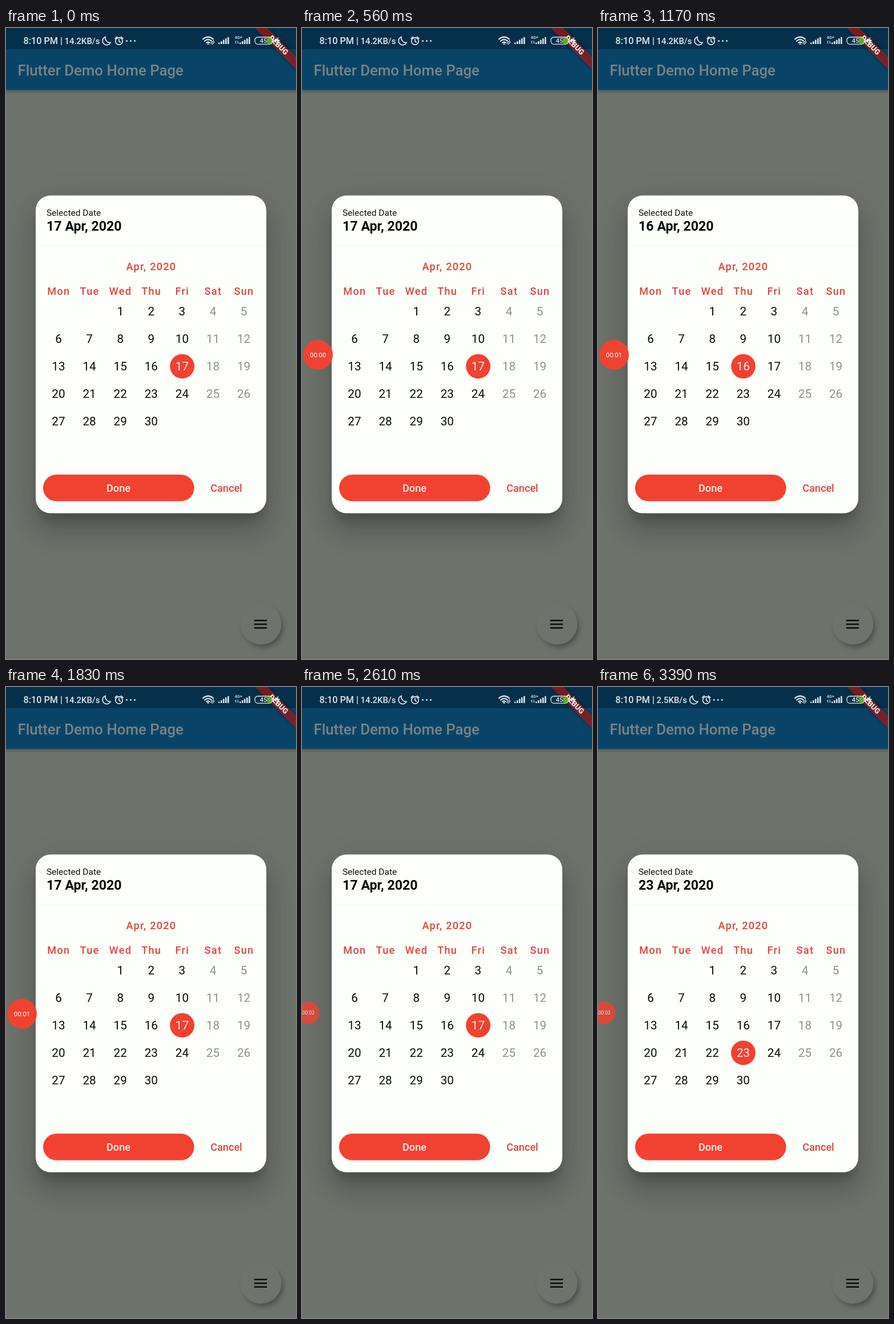
Animation of 508 by 1102 pixels, one loop 3.45 s. Source, as an HTML page:

```html
<!DOCTYPE html>
<html lang="en">
<head>
<meta charset="utf-8">
<title>Date picker</title>
<style>
  html, body { margin: 0; width: 100%; height: 100%; overflow: hidden; background: #6d726b; }
  svg { display: block; width: 100%; height: 100%; font-family: Roboto, sans-serif; }
  .mid { text-anchor: middle; }
  .medium { font-weight: 500; }
  .label { font-size: 18.1px; font-weight: 500; fill: #e0443b; }
  .spaced { letter-spacing: 1.29px; }
  .day { font-size: 20.7px; text-anchor: middle; }
  .line { fill: none; stroke: #dfe6e9; stroke-width: 1.7; stroke-linecap: round; }
</style>
</head>
<body>
<svg viewBox="0 0 508 1102" preserveAspectRatio="none">
  <defs>
    <linearGradient id="barShade" x1="0" y1="0" x2="0" y2="1">
      <stop offset="0" stop-color="#000" stop-opacity=".2"/>
      <stop offset="1" stop-color="#000" stop-opacity="0"/>
    </linearGradient>
  </defs>

  <!-- page behind the dialog -->
  <rect width="508" height="1102" fill="#6d726b"/>
  <rect y="108" width="508" height="7" fill="url(#barShade)"/>
  <rect width="508" height="108.3" fill="#094468"/>
  <rect width="508" height="37" fill="#05304b"/>
  <text class="medium" x="20.5" y="83" font-size="25.8" fill="#7c8283">Flutter Demo Home Page</text>

  <g>
    <circle cx="450.5" cy="1047" r="34.5" fill="#000" opacity=".32" style="filter:blur(5px)"/>
    <circle cx="446.5" cy="1041" r="36" fill="#6e736c"/>
    <path d="M434.7 1034.7h22.4M434.7 1041.2h22.4M434.7 1047.7h22.4" stroke="#0a0b0a" stroke-width="2.5"/>
  </g>

  <path d="M436 0H458L508 50V72Z" fill="#000" opacity=".4" style="filter:blur(3px)"/>
  <path d="M436 0H458L508 50V72Z" fill="#b71c1c" opacity=".627"/>
  <text class="mid" transform="translate(477.7 29.7) rotate(45)" y="4.7" font-size="13" font-weight="900" fill="#f0eaea">DEBUG</text>

  <!-- status bar -->
  <g fill="#dfe6e9">
    <text class="medium" x="30.5" y="28" font-size="16.2">8:10 PM</text>
    <rect x="96.3" y="16" width="1.4" height="14"/>
    <text class="medium" id="speed" x="102.5" y="28" font-size="14.9"></text>
    <g id="notices">
      <path class="line" d="M174 15.5A7.3 7.3 0 1 0 183 25.5A8.4 8.4 0 0 1 174 15.5Z"/>
      <circle class="line" cx="198" cy="23" r="6.2"/>
      <path class="line" d="M198 19.5V23.5L200.5 25M191 18.5L194.5 15.5M205 18.5L201.5 15.5"/>
      <circle cx="211.5" cy="22.5" r="1.5"/>
      <circle cx="218.5" cy="22.5" r="1.5"/>
      <circle cx="225.5" cy="22.5" r="1.5"/>
    </g>
    <path class="line" style="stroke-width:2.2" d="M345 19.5Q354 12 363 19.5M348 22.8Q354 17.5 360 22.8M351 25.6Q354 23 357 25.6"/>
    <circle cx="354" cy="27.5" r="1.5"/>
    <path class="line" style="stroke-width:1.2" d="M359 27L364 22M361 28.5L365 24.5"/>
    <g id="signal"></g>
    <text class="medium" x="400.5" y="19" font-size="7.4">4G+</text>
    <path class="line" style="stroke-width:1" d="M402.5 27V22.5L401.3 24M406 22.5V27L407.2 25.5"/>
    <rect x="457" y="17" width="9" height="10.5" rx="3" fill="#58b11f"/>
    <rect class="line" x="436" y="16" width="30.5" height="12.3" rx="5" style="stroke-width:1.3"/>
    <rect x="467.5" y="20" width="1.6" height="4.5"/>
    <text class="mid medium" x="451" y="26.2" font-size="11">45</text>
    <path d="M477.5 15L471 23.3H475L473 29.5L480.5 20.8H476.4Z"/>
  </g>

  <!-- dialog -->
  <g id="shadows"></g>
  <rect x="52" y="292.5" width="404" height="555" rx="26" fill="#fcfffa"/>
  <path d="M52 380H456" stroke="#f5f8f2"/>
  <text x="70.9" y="328" font-size="15.5" fill="#111">Selected Date</text>
  <text id="heading" x="71" y="354" font-size="23.2" font-weight="700" fill="#080808"></text>
  <text class="label spaced mid" x="254.5" y="423">Apr, 2020</text>
  <g id="weekdays"></g>
  <circle id="mark" r="21.4" fill="#f14231"/>
  <g id="days"></g>
  <rect x="65" y="780" width="264.6" height="46.5" rx="23.2" fill="#f14231"/>
  <text class="mid medium" x="197" y="809.6" font-size="18.1" fill="#fdeee9">Done</text>
  <text class="label mid" x="386" y="809.6">Cancel</text>

  <!-- recording bubble -->
  <g id="bubble">
    <circle r="26" fill="#f14231"/>
    <text id="clock" class="mid" y="4" font-size="11.5" fill="#fff"></text>
  </g>
</svg>

<script>
const LOOP = 3450;
const $ = id => document.getElementById(id);

function add(parent, tag, attrs, text = '') {
  const el = document.createElementNS('http://www.w3.org/2000/svg', tag);
  for (const k in attrs) el.setAttribute(k, attrs[k]);
  el.textContent = text;
  return $(parent).appendChild(el);
}

const colX = c => 92 + 54.1 * c;
const rowY = r => 495 + 48 * r;
const cell = day => {
  const i = day + 1; // the month starts on a Wednesday
  return { col: i % 7, row: Math.floor(i / 7) };
};

['Mon', 'Tue', 'Wed', 'Thu', 'Fri', 'Sat', 'Sun'].forEach((name, c) =>
  add('weekdays', 'text', { class: 'label spaced mid', x: colX(c) + 0.4, y: 466 }, name));

const days = [];
for (let d = 1; d <= 30; d++) {
  const { col, row } = cell(d);
  days[d] = add('days', 'text', { class: 'day', x: colX(col), y: rowY(row) + 7.3 }, d);
}

for (const x of [372, 409]) {
  for (let i = 0; i < 5; i++) {
    const h = 2.5 + 2.4 * i;
    add('signal', 'rect', { x: x + 4 * i, y: 28 - h, width: 2.6, height: h });
  }
}

// offset, blur, spread, opacity
for (const [dy, blur, grow, alpha] of [[18, 10, -8, .2], [34, 24, 2, .14], [13, 30, 8, .07]]) {
  add('shadows', 'rect', {
    x: 52 - grow, y: 292.5 - grow + dy, width: 404 + 2 * grow, height: 555 + 2 * grow,
    rx: 26 + grow, opacity: alpha, style: `filter:blur(${blur}px)`
  });
}

const picks = [[0, 17], [860, 16], [1770, 17], [2670, 23]];
const ticks = [[0, '00:00'], [950, '00:01'], [1950, '00:02'], [2910, '00:03']];
const speeds = [[0, '14.2KB/s'], [2670, '2.5KB/s']];

const stepAt = (steps, t) => steps.filter(s => s[0] <= t).pop()[1];
const progress = (t, from, to) => {
  const p = Math.min(1, Math.max(0, (t - from) / (to - from)));
  return p * p * (3 - 2 * p);
};
const mix = (a, b, p) => a + (b - a) * p;

function draw(t) {
  const pick = stepAt(picks, t);
  const { col, row } = cell(pick);
  $('heading').textContent = `${pick} Apr, 2020`;
  $('mark').setAttribute('cx', colX(col) + 0.2);
  $('mark').setAttribute('cy', rowY(row) - 0.2);
  for (let d = 1; d <= 30; d++) {
    const weekend = cell(d).col > 4;
    days[d].setAttribute('fill', d === pick ? '#fdeee9' : weekend ? '#8e918c' : '#0a0a0a');
  }

  const speed = stepAt(speeds, t);
  $('speed').textContent = speed;
  $('notices').setAttribute('transform', `translate(${speed.length < 8 ? -8.3 : 0} 0)`);

  const show = progress(t, 380, 500);
  const dock = progress(t, 2220, 2520);
  $('clock').textContent = stepAt(ticks, t);
  $('bubble').setAttribute('opacity', show * mix(1, .8, dock));
  $('bubble').setAttribute('transform',
    `translate(${mix(28, 11.2, dock)} ${mix(570.8, 569.2, dock)}) scale(${mix(1, .75, dock)})`);
}

const start = performance.now();
function loop() {
  draw((performance.now() - start) % LOOP);
  requestAnimationFrame(loop);
}
loop();
</script>
</body>
</html>
```
